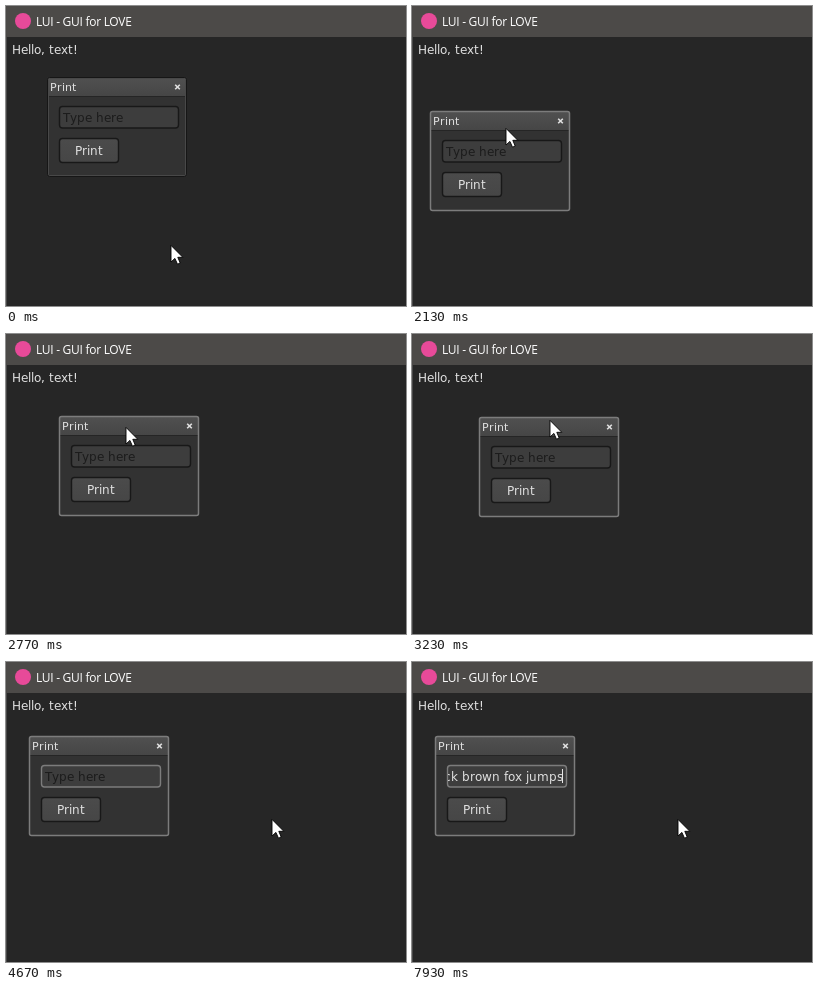
Write an HTML page that moves like this. It is 400x300 px and loops after 8 s.

```html
<!DOCTYPE html>
<html lang="en">
<head>
<meta charset="utf-8">
<title>LUI</title>
<style>
  html, body { margin: 0; width: 100%; height: 100%; overflow: hidden; background: #262626; }
  svg { display: block; }
  text { font-family: "DejaVu Sans", sans-serif; font-size: 12px; fill: #e0e0e0; white-space: pre; }
  .caption { font-family: "Open Sans", sans-serif; letter-spacing: -0.28px; fill: #fff; }
  .small { font-size: 11px; }
</style>
</head>
<body>
<svg width="400" height="300" viewBox="0 0 400 300">
  <defs>
    <linearGradient id="barFill" x2="0" y2="1">
      <stop stop-color="#505050"/><stop offset="1" stop-color="#464646"/>
    </linearGradient>
    <linearGradient id="buttonFill" x2="0" y2="1">
      <stop stop-color="#4b4b4b"/><stop offset="1" stop-color="#464646"/>
    </linearGradient>
    <clipPath id="fieldClip"><rect x="13" y="30" width="118" height="21"/></clipPath>
  </defs>
  <rect width="400" height="300" fill="#262626"/>
  <rect y="30" width="1" height="270" fill="#484848"/>
  <rect width="400" height="31" fill="#4c4a48"/>
  <circle cx="17" cy="15" r="8" fill="#e74a99"/>
  <text class="caption" x="30" y="20">LUI - GUI for LOVE</text>
  <text data-x="6" y="48">Hello, text!</text>

  <g id="win">
    <rect width="140" height="100" rx="2" fill="#323232"/>
    <rect x="1" y="1" width="138" height="18" fill="url(#barFill)"/>
    <rect x="1" y="19" width="138" height="1" fill="#252525"/>
    <rect id="inner" x="1.5" y="1.5" width="137" height="97" rx="1" fill="none" stroke="#484848"/>
    <rect id="frame" x="0.5" y="0.5" width="139" height="99" rx="2" fill="none"/>
    <text class="small" data-x="3" y="14">Print</text>
    <path d="M128.2 7.7l4.6 4.6m0 -4.6l-4.6 4.6" stroke="#e0e0e0" stroke-width="1.6"/>
    <rect id="field" x="12.5" y="29.5" width="119" height="21.5" rx="3" fill="#3d3d3d" stroke-width="1.4"/>
    <g clip-path="url(#fieldClip)">
      <text id="hint" data-x="16" y="45" style="fill:#1c1c1c">Type here</text>
      <text id="typed" y="45"></text>
      <rect id="caret" y="33" width="1" height="14" fill="#e6e6e6"/>
    </g>
    <rect x="12.5" y="61.5" width="59" height="24" rx="3" fill="url(#buttonFill)" stroke="#181818" stroke-width="1.4"/>
    <text data-x="28" y="78">Print</text>
  </g>

  <path id="cursor" d="M0 0.4V17L3.9 13.4L6.5 19.2L9.2 18L6.8 12.3H11.8Z" fill="#fff" stroke="#000" stroke-width="0.9"/>
</svg>
<script>
const FPS = 30, LOOP = 8000;
const $ = id => document.getElementById(id);
const pen = document.createElement('canvas').getContext('2d');

// Pen positions with every advance rounded to whole pixels
function pens(str, x, size = 12) {
  pen.font = size + 'px "DejaVu Sans", sans-serif';
  return [x, ...Array.from(str, ch => x += Math.round(pen.measureText(ch).width))];
}

for (const el of document.querySelectorAll('[data-x]')) {
  const size = el.classList.contains('small') ? 11 : 12;
  el.setAttribute('x', pens(el.textContent, +el.dataset.x, size).slice(0, -1).join(' '));
}

// Mouse key points: tick, x, y
const PATH = [
  [11, 165, 239], [25, 238, 185], [36, 169, 95], [46, 121, 74], [55, 114, 78],
  [58, 114, 78], [63, 91, 112], [70, 176, 178], [71, 184, 178], [75, 304, 125],
  [78, 230, 70], [82, 126, 89], [83, 120, 93], [85, 106, 115], [88, 140, 157],
  [90, 192, 110], [92, 165, 57], [96, 140, 90], [97, 138, 86], [115, 96, 81],
  [118, 96, 81], [123, 100, 113], [132, 266, 157]
];

// Slope at a key; zero at ends, turning points and holds
function slope(i, k) {
  const a = PATH[i - 1], b = PATH[i], c = PATH[i + 1];
  if (!a || !c || (b[k] - a[k]) * (c[k] - b[k]) <= 0) return 0;
  return (c[k] - a[k]) / (c[0] - a[0]);
}

function mouse(n) {
  const last = PATH.length - 1;
  n = Math.min(Math.max(n, PATH[0][0]), PATH[last][0]);
  const i = Math.max(1, PATH.findIndex(p => p[0] >= n)) - 1;
  const a = PATH[i], b = PATH[i + 1], d = b[0] - a[0], u = (n - a[0]) / d;
  return [1, 2].map(k => Math.round(
    a[k] + (b[k] - a[k]) * u * u * (3 - 2 * u) +
    d * u * (1 - u) * (slope(i, k) * (1 - u) - slope(i + 1, k) * u)
  ));
}

// Bursts of typing, one key every KEY_GAP ticks
const BURSTS = { 148: 'T', 155: 'he', 165: ' q', 174: 'uick ', 188: 'b', 194: 'rown ', 213: 'fox j', 229: 'umps' };
const KEY_GAP = 3;
const TEXT = Object.values(BURSTS).join('');
const textPens = pens(TEXT, 16);
const keys = Object.entries(BURSTS).flatMap(([from, str]) =>
  Array.from(str, (_, i) => +from + i * KEY_GAP));

const PRESS = 59, RELEASE = 116, CLICK = 123;
const BLINK_OFF = 140, BLINK_ON = 150;
const GRAB = [73, 7], FIELD_END = 127, SCROLL = 52;

const move = (id, x, y) => $(id).setAttribute('transform', `translate(${x} ${y})`);
const show = (id, on) => $(id).style.display = on ? '' : 'none';

function draw(n) {
  move('cursor', ...mouse(n));

  // The dragged window trails the mouse by one tick
  const held = mouse(Math.min(Math.max(n, PRESS), RELEASE) - 1);
  move('win', held[0] - GRAB[0], held[1] - GRAB[1]);
  const active = n >= PRESS;
  $('frame').setAttribute('stroke', active ? '#7c7c7c' : '#161616');
  $('frame').setAttribute('stroke-width', active ? 1.5 : 1);
  show('inner', !active);

  const focus = n >= CLICK;
  $('field').setAttribute('stroke', focus ? '#7c7c7c' : '#181818');

  const count = keys.filter(k => n >= k).length;
  const shift = textPens[count] > FIELD_END ? SCROLL : 0;
  show('hint', !count);
  $('typed').textContent = TEXT.slice(0, count);
  $('typed').setAttribute('x', textPens.slice(0, count || 1).map(x => x - shift).join(' '));
  $('caret').setAttribute('x', textPens[count] - shift - 1);
  show('caret', focus && (n < BLINK_OFF || n >= BLINK_ON));
}

const start = performance.now();
function tick() {
  const t = (performance.now() - start) % LOOP;
  draw(Math.floor((t + 4) * FPS / 1000));
  requestAnimationFrame(tick);
}
tick();
</script>
</body>
</html>
```
